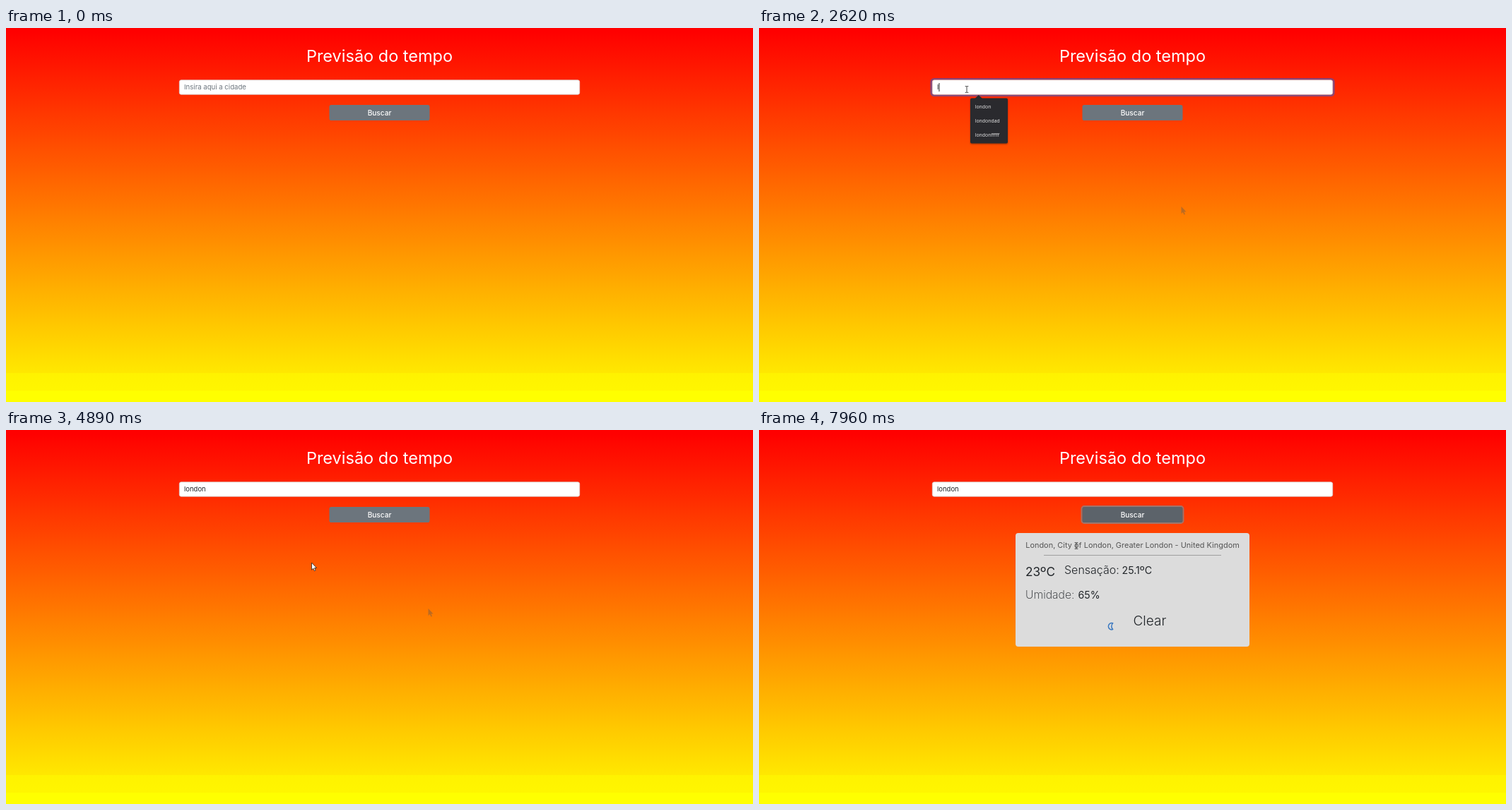
An HTML page that plays this animation: 1057x530 px, repeating every 8 s.

```html
<!DOCTYPE html>
<html lang="pt">
<head>
<meta charset="utf-8">
<title>Previsão do tempo</title>
<style>
html, body { margin: 0; width: 100%; height: 100%; overflow: hidden; }
svg { display: block; width: 100vw; height: 100vh; font-family: Inter, "Open Sans", sans-serif; }
.light { font-weight: 300; }
.thin { font-weight: 200; }
#menu text { font: 6.9px "Open Sans", "Noto Sans", sans-serif; fill: #eee; }
</style>
</head>
<body>
<svg viewBox="0 0 1057 530" preserveAspectRatio="none">
  <defs>
    <linearGradient id="sky" x2="0" y2="1">
      <stop offset="0.01" stop-color="#f00"/>
      <stop offset="0.922" stop-color="#ffe800"/>
      <stop offset="0.922" stop-color="#fff200"/>
      <stop offset="0.97" stop-color="#fff600"/>
      <stop offset="0.97" stop-color="#ff0"/>
    </linearGradient>
    <filter id="shade" x="-20%" y="-20%" width="140%" height="140%">
      <feDropShadow dx="0" dy="1" stdDeviation="1.2" flood-opacity=".4"/>
    </filter>
    <path id="pointer" d="M0 0V10.2L2.3 8.1L3.8 11.6L5.5 10.9L4 7.5H7Z"/>
  </defs>
  <rect width="1057" height="530" fill="url(#sky)"/>
  <text x="528.5" y="48" font-size="23.5" fill="#fff" text-anchor="middle">Previsão do tempo</text>

  <rect id="focus" x="243.7" y="72.2" width="569.6" height="23.6" rx="4" fill="none" stroke="#2860d8" stroke-opacity=".55" stroke-width="2.6"/>
  <rect x="245.3" y="73.8" width="566.4" height="20.4" rx="2.6" fill="#fff" stroke="#ced4da" stroke-width=".7"/>
  <text id="hint" x="252" y="87.2" font-size="9.6" fill="#6c757d">Insira aqui a cidade</text>
  <text id="typed" x="252" y="87.2" font-size="9.5" fill="#212529"></text>
  <rect id="caret" y="78" width=".9" height="12" fill="#111"/>

  <rect id="glow" x="456.6" y="108.1" width="143.8" height="23.8" rx="3.5" fill="none" stroke="#828a91" stroke-opacity=".75" stroke-width="2"/>
  <rect id="button" x="457.5" y="109" width="142" height="22" rx="2.8"/>
  <text x="528.5" y="123.5" font-size="10.1" font-weight="500" fill="#fff" text-anchor="middle">Buscar</text>

  <g id="ghosts" fill="#555"></g>

  <g id="card" fill="#212529">
    <rect x="363" y="146" width="331" height="161" rx="4" fill="#dcdcdc"/>
    <text x="528.5" y="167" font-size="10.95" fill="#555" text-anchor="middle">London, City of London, Greater London - United Kingdom</text>
    <path d="M403 177.5H654" stroke="#999" stroke-width=".9"/>
    <text x="377" y="206.6" font-size="17.2">23ºC</text>
    <text x="432" y="204" font-size="16" class="light">Sensação:</text>
    <text x="513.5" y="204" font-size="14.2">25.1ºC</text>
    <text x="377" y="238.8" font-size="15.8" class="thin">Umidade:</text>
    <text x="451.5" y="238.8" font-size="14.2">65%</text>
    <text x="529.5" y="277.2" font-size="19" class="light">Clear</text>
    <path d="M500.7 273.8A4.7 4.7 0 1 0 500.7 282.6A6 6 0 0 1 500.7 273.8Z" fill="none" stroke="#3a78c0" stroke-width="1.5" stroke-linejoin="round"/>
  </g>

  <g id="menu">
    <path d="M305.5 100L310.7 95L316 100Z" fill="#292a2d"/>
    <rect id="panel" x="299" y="99.5" rx="2" fill="#292a2d" filter="url(#shade)"/>
    <g id="items"></g>
  </g>

  <circle id="click" r="5.2" fill="#ffe11a" opacity=".7"/>
  <g id="mouse">
    <use id="arrow" href="#pointer" fill="#fff" stroke="#222" stroke-width=".8"/>
    <path id="beam" d="M-2.3 -4.4H-.6L0 -4L.6 -4.4H2.3M0 -4V4M-2.3 4.4H-.6L0 4L.6 4.4H2.3" fill="none" stroke="#333" stroke-width=".9"/>
    <path id="hand" d="M-.9 .8Q0 -.6 .9 .8V4.6L4 5Q6.6 5.3 6.6 7.2L6 10V12H.2V10.6L-3 7.2Q-3 5.8 -1.7 6.2L-.9 7Z" fill="#fff" stroke="#222" stroke-width=".8" stroke-linejoin="round"/>
  </g>
</svg>
<script>
const LOOP = 8000, CARD_AT = 6260;
const $ = id => document.getElementById(id);
const show = (id, on) => $(id).setAttribute('visibility', on ? 'visible' : 'hidden');
const put = (id, attrs) => { for (const k in attrs) $(id).setAttribute(k, attrs[k]); };
const between = (v, a, b) => v >= a && v < b;

// start, end, number of hops, points spread evenly over the time
const moves = [
  [70, 680, 10, [957, 476], [597, 253], [390, 160], [311, 132]],
  [940, 1010, 2, [306, 121], [301, 111]],
  [1340, 1480, 3, [298, 100], [296, 93], [294, 87]],
  [4270, 4690, 7, [310, 105], [370, 160], [412, 207]],
  [4820, 5030, 4, [422, 199], [432.5, 188], [437, 183], [442, 177]],
  [5100, 5520, 7, [452, 162], [490, 138], [515, 129], [520, 126]],
  [6660, 7420, 12, [515, 130], [470, 150], [400, 171], [389, 165]],
  [7490, 7960, 7, [384, 164], [400, 164], [449, 164]]
];
const keys = [2550, 2750, 2950, 3210, 3310, 3410];
const clicks = [[2030, 2160], [4690, 4760], [5720, 5860]];
// time, x, y, opacity
const ghosts = [[341, 597.5, 253, .4], [4960, 432, 188.5, .25], [5100, 441, 177, .12], [5240, 457, 156.5, .16]];
const cities = ['london', 'hong kong', 'Vila Velha - ES', 'Vila Velha', 'vila velha', 'berlim'];
const matches = ['london', 'londondad', 'londonfffff'];

$('ghosts').innerHTML = ghosts.map(([, x, y, o]) =>
  `<use href="#pointer" x="${x}" y="${y}" opacity="${o}"/>`).join('');

function pointerAt(t) {
  const move = moves.filter(m => t >= m[0]).pop();
  if (!move) return null;
  const [a, b, n, ...pts] = move, last = pts.length - 1;
  const hop = Math.min(n - 1, Math.floor((t - a) / (b - a) * (n - 1) + .01));
  const p = hop / (n - 1) * last, i = Math.min(last - 1, Math.floor(p));
  return [0, 1].map(d => pts[i][d] + (pts[i + 1][d] - pts[i][d]) * (p - i));
}

function cursorKind([x, y], t) {
  if (between(x, 457, 600) && between(y, 109, 131.5)) return 'hand';
  if (between(x, 245, 812) && between(y, 73, 95)) return 'beam';
  if (t >= CARD_AT && between(x, 377, 681) && between(y, 157, 170)) return 'beam';
  return 'arrow';
}

function drawMenu(t) {
  const open = between(t, 2030, 4690), short = t >= 2620;
  show('menu', open);
  const list = short ? matches : cities;
  put('panel', { width: short ? 53 : 66.3, height: short ? 64 : 123.5 });
  if ($('items').dataset.n !== String(list.length)) {
    $('items').dataset.n = list.length;
    $('items').innerHTML = list.map((s, i) =>
      `<text x="305.7" y="${114.4 + 19.9 * i}">${s}</text>`).join('');
  }
}

function drawField(t) {
  const count = keys.filter(k => t >= k).length;
  $('typed').textContent = 'london'.slice(0, count);
  show('hint', !count);
  const since = t - Math.max(2030, ...keys.filter(k => t >= k));
  show('caret', between(t, 2030, 4690) && Math.floor(since / 530) % 2 === 0);
  put('caret', { x: 252.2 + (count ? $('typed').getComputedTextLength() : 0) });
  const on = t < 2100 ? 0 : t < 2160 ? .5 : t < 4690 ? 1 : t < 4760 ? .6 : t < 4820 ? .2 : 0;
  put('focus', { opacity: on });
}

function drawButton(t) {
  const h = Math.max(0, Math.min(1, (t - 5310) / 150));
  const mix = (a, b) => Math.round(a + (b - a) * h);
  put('button', { fill: `rgb(${mix(108, 92)},${mix(117, 99)},${mix(125, 106)})` });
  put('glow', { opacity: Math.max(0, Math.min(1, Math.floor((t - 5720) / 70 + 1) / 4)) });
}

function draw(t) {
  drawField(t);
  drawMenu(t);
  drawButton(t);
  show('card', t >= CARD_AT);
  ghosts.forEach((g, i) =>
    $('ghosts').children[i].setAttribute('visibility', between(t, g[0], CARD_AT) ? 'visible' : 'hidden'));

  const at = pointerAt(t), kind = at && cursorKind(at, t);
  for (const k of ['arrow', 'beam', 'hand']) show(k, k === kind);
  show('click', at && clicks.some(c => between(t, ...c)));
  if (at) {
    put('mouse', { transform: `translate(${at})` });
    put('click', { cx: at[0], cy: at[1] });
  }
}

const start = performance.now();
function tick() {
  draw((performance.now() - start) % LOOP);
  requestAnimationFrame(tick);
}
tick();
</script>
</body>
</html>
```
